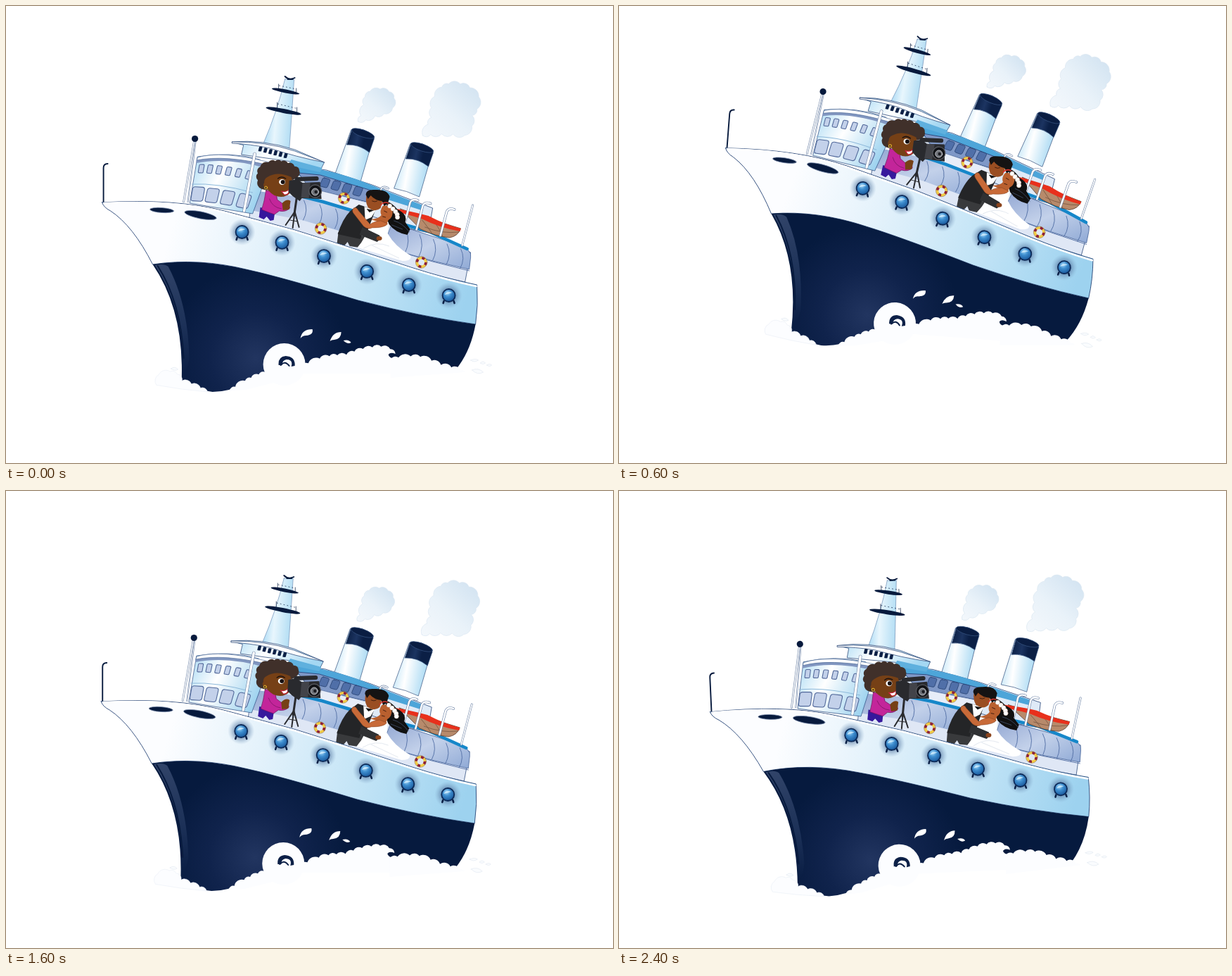
Recreate the animation shown at these times as an HTML page. Size 863 px wide and 649 px high, loop 2.6 s.

```html
<!DOCTYPE html>
<html lang="en">
<head>
<meta charset="utf-8">
<title>Wedding cruise</title>
<style>
html, body { margin: 0; width: 100%; height: 100%; overflow: hidden; background: #fff; }
svg { display: block; width: 100%; height: 100%; }
</style>
</head>
<body>
<svg viewBox="0 0 863 649" xmlns="http://www.w3.org/2000/svg" stroke-linecap="round" stroke-linejoin="round">
<defs>
  <linearGradient id="side" gradientUnits="userSpaceOnUse" x1="240" y1="300" x2="650" y2="430">
    <stop offset="0" stop-color="#fcfdff"/><stop offset=".3" stop-color="#e4f2fb"/>
    <stop offset=".65" stop-color="#c3e4f6"/><stop offset="1" stop-color="#9dd2ef"/>
  </linearGradient>
  <radialGradient id="navy" gradientUnits="userSpaceOnUse" cx="355" cy="500" r="130">
    <stop offset="0" stop-color="#223560"/><stop offset=".5" stop-color="#10234c"/><stop offset="1" stop-color="#061a3e"/>
  </radialGradient>
  <linearGradient id="stem" gradientUnits="userSpaceOnUse" x1="230" y1="370" x2="256" y2="520">
    <stop offset="0" stop-color="#4c5e84"/><stop offset=".55" stop-color="#2b4068"/><stop offset="1" stop-color="#0a1e44"/>
  </linearGradient>
  <linearGradient id="steel" x1="0" y1="0" x2="1" y2=".25">
    <stop offset="0" stop-color="#a9daf4"/><stop offset=".45" stop-color="#fff"/><stop offset="1" stop-color="#a4d7f2"/>
  </linearGradient>
  <linearGradient id="tower" x1="0" y1="0" x2="1" y2=".2">
    <stop offset="0" stop-color="#8fcdf0"/><stop offset=".5" stop-color="#e8f6fd"/><stop offset="1" stop-color="#b4def4"/>
  </linearGradient>
  <linearGradient id="house" x1="0" y1="0" x2="1" y2=".4">
    <stop offset="0" stop-color="#a5d8f3"/><stop offset=".45" stop-color="#fff"/><stop offset="1" stop-color="#9fd3ef"/>
  </linearGradient>
  <linearGradient id="glass" x1="0" y1="0" x2="1" y2="1">
    <stop offset="0" stop-color="#91a6d2"/><stop offset=".5" stop-color="#c3d1ea"/><stop offset="1" stop-color="#8fa9d5"/>
  </linearGradient>
  <linearGradient id="cap" x1="0" y1="0" x2="1" y2=".2">
    <stop offset="0" stop-color="#071a3d"/><stop offset=".45" stop-color="#1c3461"/><stop offset=".7" stop-color="#0b1f45"/>
  </linearGradient>
  <linearGradient id="smoke" x1="0" y1="1" x2="1" y2="0">
    <stop offset="0" stop-color="#f4f8fc"/><stop offset=".45" stop-color="#e9f2f9"/><stop offset="1" stop-color="#cfe1f0"/>
  </linearGradient>
  <radialGradient id="halo"><stop offset=".4" stop-color="#4d6c96" stop-opacity=".75"/><stop offset="1" stop-color="#7fa5c8" stop-opacity="0"/></radialGradient>
  <radialGradient id="lens" cx=".4" cy=".3" r=".75">
    <stop offset="0" stop-color="#a5d8f8"/><stop offset=".4" stop-color="#3f8fd0"/><stop offset="1" stop-color="#155296"/>
  </radialGradient>
</defs>

<g id="ship">
  <g id="clouds" fill="url(#smoke)" stroke="#dbe7f2" stroke-width=".7"></g>

  <!-- mast -->
  <path d="M396 104H409Q406 150 402 205L365 196Q385 150 396 104Z" fill="url(#tower)" stroke="#7f9dc0" stroke-width=".8"/>
  <g fill="none" stroke="#071a3d">
    <path d="M396 100Q402 106 410 102M400 104H407" stroke-width="1.8"/>
    <path d="M387 111V118M412 117V123M385 137V146M413 144V152" stroke-width=".7"/>
    <path d="M386 139L415 146M388 113L412 118" stroke-width=".7" stroke-dasharray="1 4"/>
  </g>
  <g fill="#071a3d">
    <ellipse cx="397" cy="121" rx="20" ry="2.6" transform="rotate(11 397 121)"/>
    <ellipse cx="394" cy="149" rx="25.5" ry="3" transform="rotate(11 394 149)"/>
  </g>

  <g id="funnels"></g>

  <!-- upper deck -->
  <path d="M400 226L455 233L520 254L606 287L600 322L500 300L400 274Z" fill="#dfeaf7" stroke="#2d4a7c" stroke-width=".8"/>
  <path d="M408 227Q470 232 530 259L592 283L590 290L520 268L412 240Z" fill="#4da5d9"/>
  <path d="M415 237L446 240L519 262L516 279L432 259Z" fill="#7f98c7" stroke="#27457c" stroke-width=".9"/>
  <g id="slots" fill="#506fa8" stroke="#2b4677" stroke-width=".8"></g>
  <path d="M433 259L520 281L516 297L430 276Z" fill="#e7edf8" stroke="#91a6cb" stroke-width=".6"/>

  <!-- promenade -->
  <path d="M350 270L425 275L500 292L575 317L660 350L652 392L580 376L345 305Z" fill="#dfe7f5" stroke="#33507f" stroke-width=".8"/>
  <path d="M352 262L422 272L497 293L490 324L420 304L347 290Z" fill="url(#glass)"/>
  <path d="M548 310L575 317L640 338Q663 346 660 357L658 374L606 362L536 342Z" fill="url(#glass)" stroke="#46649a" stroke-width=".8"/>
  <path d="M422 271L450 278L500 293M560 309L600 320L655 345" fill="none" stroke="#1687c9" stroke-width="4.500"/>
  <g id="ribs" fill="none" stroke="#526fa5" stroke-width=".9"></g>

  <!-- lifeboat -->
  <path d="M560 288Q590 299 646 316Q642 327 630 329Q610 327 589 317Z" fill="#b78a6b" stroke="#5c3a2a" stroke-width=".8"/>
  <path d="M591 304Q600 315 605 323M610 309Q618 320 620 327M595 314Q620 324 643 321" fill="none" stroke="#775641" stroke-width=".8"/>
  <path d="M542 286Q570 290 600 298Q625 311 646 316L645 320Q616 315 590 302Q565 294 542 290Z" fill="#e8301c"/>

  <!-- forward house and bridge -->
  <path d="M272 214Q317 206 360 218L373 232L350 295L261 280Z" fill="url(#house)" stroke="#3c5c8e" stroke-width=".8"/>
  <path d="M270 219Q308 206 373 225L372 231Q315 214 270 223Z" fill="#8196c0"/>
  <path d="M272 215Q306 205 374 222L373 226Q310 211 271 219Z" fill="#fff" stroke="#3c5c8e" stroke-width=".6"/>
  <path d="M264 253Q300 251 350 265" fill="none" stroke="#8db9da"/>
  <path d="M321 193Q364 189 410 204L452 222L446 234L405 221L334 211L337 198Z" fill="url(#steel)" stroke="#36527f" stroke-width=".8"/>
  <path d="M321 193Q368 192 410 206L452 222Q410 214 375 202Q346 196 321 195Z" fill="#fff" stroke="#36527f" stroke-width=".8"/>
  <path d="M405 218L449 230L446 236L400 226Z" fill="#5fb0de"/>
  <g id="panes" fill="#c3d1ea" stroke="#52699a" stroke-width="1.1"></g>
  <g id="bridge" fill="#0b2046"></g>

  <g id="rails" fill="none"></g>
  <circle cx="268" cy="188.500" r="4.600" fill="#071a3d"/>
  <path d="M138 279V230Q138 224 144 224" fill="none" stroke="#071a3d" stroke-width="1.900"/>
  <g id="rings"></g>

  <!-- camerawoman -->
  <path d="M361 286L382 291L380 304L375 305L370 299L366 303L359 300Z" fill="#36189c"/>
  <path d="M369 262Q385 262 385 275L393 281L401 277L403 287Q397 293 388 291L381 296Q367 291 363 289Q367 277 369 262Z" fill="#c3259a" stroke="#6d1259" stroke-width=".7"/>
  <path d="M374 274Q378 286 391 288" fill="none" stroke="#7e1766" stroke-width=".8"/>
  <path d="M392 280Q399 273 404 277L402 289L393 290Z" fill="#764016"/>
  <g id="hair" fill="#40302a"></g>
  <path d="M371 243Q385 234 405 243Q409 254 405 264Q395 275 381 269Q371 263 367 254Q365 246 371 243Z" fill="#764016"/>
  <circle cx="369" cy="254" r="3.500" fill="#764016"/>
  <circle cx="369" cy="258" r="2" fill="none" stroke="#e5b82e"/>
  <ellipse cx="392" cy="250" rx="4.500" ry="4" fill="#fff"/>
  <circle cx="393" cy="250" r="3" fill="#171011"/>
  <path d="M386 245Q391 241 397 245" fill="none" stroke="#1c1210" stroke-width="1.500"/>
  <path d="M391 263Q398 265 402 260Q402 269 395 268Z" fill="#fff" stroke="#c51f38" stroke-width="1.200"/>
  <!-- camera on tripod -->
  <g fill="none" stroke="#292a2e">
    <path d="M413 270L409 298" stroke-width="3"/>
    <path d="M410 292L397 311M410 292L407 315M410 292L416 314" stroke-width="2"/>
    <path d="M403 304L414 306"/>
    <path d="M413 246L441 245" stroke-width="6"/>
  </g>
  <path d="M402 248L413 246L421 251L446 250L448 274L420 273L417 277L407 270L401 264Z" fill="#292a2e"/>
  <path d="M421 251L432 251L430 273L419 272Z" fill="#424349"/>
  <circle cx="439" cy="263" r="9" fill="#111216" stroke="#55575d" stroke-width="1.300"/>
  <circle cx="439" cy="264" r="5" fill="#6f7279" stroke="#c9cbd0" stroke-width=".9"/>
  <circle cx="440" cy="264" r="2.200" fill="#1a1b20"/>

  <!-- couple -->
  <path d="M472 321L510 327L502 343L488 341L485 335L480 341L470 337Z" fill="#393a3c"/>
  <path d="M517 303Q529 302 544 306L542 323Q552 341 574 354Q578 362 563 362L499 343Q514 326 517 303Z" fill="#fff"/>
  <path d="M508 344Q526 333 544 341M520 340L558 358" fill="none" stroke="#e4e9f0"/>
  <path d="M541 278Q548 279 556 289Q571 296 567 307L574 317L570 325Q553 322 544 310L540 300Z" fill="#111"/>
  <path d="M551 305Q563 308 573 321M548 311L563 317" fill="none" stroke="#40506b" stroke-width=".8"/>
  <path d="M535 284Q541 281 549 290Q550 300 543 304L541 309L527 306L518 303Q530 302 533 297Q530 291 535 284Z" fill="#b9602f"/>
  <path d="M501 282L513 286L524 291L520 302L514 318L531 326L528 332L506 324L503 331L471 324Q478 302 489 291Z" fill="#242527"/>
  <path d="M509 285L525 290L519 300L510 304Z" fill="#fff"/>
  <path d="M512 288L523 290L516 293Z" fill="#151515"/>
  <path d="M494 287Q490 290 494 295L508 313Q514 318 520 315Q539 315 542 309L532 305Q522 306 517 310L500 290Q498 285 494 287Z" fill="#c86a38" stroke="#7c3f20" stroke-width=".5"/>
  <path d="M506 314L528 325L533 330L527 335L502 325Z" fill="#303133"/>
  <ellipse cx="530" cy="330" rx="4" ry="3" fill="#8c451d"/>
  <path d="M513 266Q524 267 535 276L532 287Q524 294 514 286Q509 276 513 266Z" fill="#9a4e22"/>
  <path d="M511 268Q511 260 524 261Q542 260 545 271L542 281L537 284L534 277Q524 276 518 269L514 274Z" fill="#151313"/>
  <path d="M532 283Q537 277 543 280" fill="none" stroke="#d7332b" stroke-width="1.500"/>
  <path d="M520 277Q524 279 527 277M537 291L541 293M535 299L539 300" fill="none" stroke="#39190d" stroke-width=".9"/>
  <g id="flowers" fill="#fff" stroke="#e4c8b8" stroke-width=".5"></g>

  <!-- hull -->
  <path d="M136 279Q240 273 310 291L410 318L480 340L575 371Q625 387 669 396Q671 425 667 452Q589 441 500 418Q394 386 345 375Q273 357 208 367Q180 312 148 291Q138 286 136 279Z" fill="url(#side)" stroke="#2a4778" stroke-width=".9"/>
  <path d="M139 280Q240 275 310 293L410 320L480 342L575 373Q625 389 668 398" fill="none" stroke="#fff" stroke-width="2.500"/>
  <path d="M208 367Q273 357 345 375Q394 386 500 418Q589 441 667 452Q660 490 640 515L560 506L430 516L340 535Q318 548 293 548Q270 546 249 533Q253 433 208 367Z" fill="url(#navy)"/>
  <path d="M211 368Q224 365 230 370Q258 422 260 500Q257 520 251 522Q254 432 211 368Z" fill="url(#stem)" opacity=".6"/>
  <path d="M215 369Q248 420 252 500" fill="none" stroke="#071a3d" stroke-width="2"/>
  <g fill="#071a3d" stroke="#8091b1" stroke-width=".7">
    <ellipse cx="221" cy="290" rx="17" ry="3.500" transform="rotate(4 221 290)"/>
    <ellipse cx="276" cy="297" rx="23" ry="5" transform="rotate(11 276 297)"/>
  </g>
  <g id="ports"></g>

  <!-- surf -->
  <g id="surf" fill="#fcfdff"></g>
  <circle cx="395" cy="509" r="30" fill="#fcfdff"/>
  <path d="M387 510Q386 498 397 497Q411 498 410 511L405 512Q408 502 398 502Q392 503 392 510Z" fill="#0c2047"/>
  <path d="M390 510Q396 503 402 511" fill="none" stroke="#0c2047" stroke-width="2"/>
  <g fill="#fff">
    <path d="M418 472Q420 459 435 459Q437 467 426 468Q421 468 418 472Z"/>
    <path d="M460 476Q464 463 476 463Q476 473 466 474Q462 474 460 476Z"/>
    <path d="M479 475Q487 473 490 478Q485 481 479 475Z"/>
  </g>
  <path d="M660 503Q667 500 671 503Q665 507 660 503ZM674 507Q677 503 681 507Q677 510 674 507ZM662 517Q671 513 678 520Q670 525 662 517ZM683 510Q687 507 690 510Q687 513 683 510ZM234 515Q239 511 244 516Q239 519 234 515Z" fill="#fafcfe" stroke="#e4eaf2" stroke-width=".7"/>
</g>
</svg>

<script>
const byId = id => document.getElementById(id);
const fill = (id, ...parts) => { byId(id).innerHTML = parts.join(''); };
const repeat = (n, make) => Array.from({ length: n }, (_, i) => make(i)).join('');
const circle = (x, y, r, more = '') => `<circle cx="${x}" cy="${y}" r="${r}" ${more}/>`;

let seed = 7;
const random = () => (seed = seed * 16807 % 2147483647) / 2147483647;

// Rounded bumps of about the given width along a guide curve
function bumps(guide, width, tail = 'Z') {
  const line = document.createElementNS('http://www.w3.org/2000/svg', 'path');
  line.setAttribute('d', guide);
  const length = line.getTotalLength();
  let from = line.getPointAtLength(0), d = `M${from.x} ${from.y}`;
  for (let at = 0; at < length;) {
    at += width * (.7 + .6 * random());
    if (length - at < width * .4) at = length;
    const to = line.getPointAtLength(at);
    const r = Math.hypot(to.x - from.x, to.y - from.y) * .66;
    d += `A${r} ${r} 0 0 1 ${to.x} ${to.y}`;
    from = to;
  }
  return `<path d="${d}${tail}"/>`;
}

function pane(x, y, w, h, tilt) {
  return `<rect x="${-w / 2}" y="${-h / 2}" width="${w}" height="${h}" rx="${Math.min(w, h) * .2}"
    transform="translate(${x} ${y}) rotate(${tilt}) skewX(-7)"/>`;
}

function funnel(x, y) {
  return `<g transform="translate(${x} ${y})" stroke="#36527f" stroke-width=".7">
    <path d="M-15 -5L-38 58Q-20 61 -2 70L17 5Z" fill="url(#steel)"/>
    <path d="M-14 -5Q4 -11 18 7L11 27Q-4 15 -21 16Z" fill="url(#cap)"/>
    <ellipse cx="2" cy="0" rx="17" ry="5" transform="rotate(19 2 0)" fill="#0a1d42"/></g>`;
}

function ring(x, y, r = 6.3) {
  const band = (color, more = '') => circle(x, y, r, `fill="none" stroke="${color}" stroke-width="3.6" ${more}`);
  return band('#f1cb45') + band('#8c1f3b', 'stroke-dasharray="4 5.9" stroke-linecap="butt"')
    + circle(x, y, r + 2, 'fill="none" stroke="#8a6430" stroke-width=".5"');
}

function port(i) {
  const sag = Math.sin(i * Math.PI * .4);
  const x = 335 + i * 58.8 - 2 * sag, y = 321 + i * 18 - 3.3 * sag;
  return circle(x, y, 19, 'fill="url(#halo)"')
    + `<path d="M${x - 7} ${y + 8}l-1 3M${x + 7} ${y + 8}l1 3" stroke="#0b2046" stroke-width="2.5"/>`
    + circle(x, y, 9, 'fill="url(#lens)" stroke="#0c2a58" stroke-width="1.8"')
    + `<path d="M${x - 6} ${y - 1}q3 -6 11 -3q-5 2 -11 3Z" fill="#d6effd" opacity=".75"/>`;
}

// White tube with a grey outline
function rail(d, w) {
  return `<path d="${d}" stroke="#6d83a6" stroke-width="${w + 1.2}"/><path d="${d}" stroke="#fff" stroke-width="${w}"/>`;
}
const davit = x => rail(`M${x} ${313 + (x - 565) / 4}l9 -34q3 -6 11 -3`, 2.4);
const rib = (x, y, h) => `<path d="M${x} ${y}q7 ${h * .5} -1 ${h}"/>`;

fill('clouds',
  bumps('M500 164Q508 150 508 138Q509 119 530 118Q552 119 552 138Q548 154 527 154Q512 163 500 164Z', 13),
  bumps('M592 184Q594 170 605 164Q599 130 623 112Q650 104 671 126Q675 144 662 155Q664 176 655 184Q622 179 592 184Z', 15));
fill('funnels', funnel(505, 181), funnel(589, 201));
fill('slots', repeat(4, i => pane(453 + i * 15.5, 251 + i * 4, 11, 13, 15)));
fill('ribs',
  repeat(3, i => rib(423 + i * 22.5, 276 + i * 6, 28)),
  repeat(5, i => rib(568 + i * 19.5, 318 + i * 6.7, 32 - i)),
  '<path d="M536 342L606 363L658 376"/>');
fill('panes',
  repeat(6, i => pane(277 + i * 12 + i * i * .3, 231 + (i + i * i) * .3, 7, 12, 3 + i * 2)),
  repeat(4, i => pane(272 + i * 20 + i * i * .6, 267 + i * 1.5 + i * i * .6, 17, 20, 3 + i * 3)));
fill('bridge', repeat(6, i => pane(361 + i * 7.2, 203 + i * 1.9, 4.5, 7, 8)));
fill('rails',
  rail('M252 278L267 192', 1.5), rail('M258 278L269 192', .8), rail('M338 291L353 210', 3.4),
  rail('M530 270L533 259Q537 255 543 259', 1.6), rail('M648 340L663 283', 1.7),
  davit(565), davit(583), davit(617));
fill('rings', ring(480, 273), ring(447, 316), ring(590, 364), ring(544, 346, 5));
fill('hair', bumps('M363 260Q352 244 361 228Q372 220 386 220Q408 222 418 236Q418 244 404 246', 11, 'Q390 235 374 244L371 262Z'));
fill('flowers', repeat(5, i => circle(545 + 11 * Math.sin(i * .42), 284 + i * 4, 3.1)));
fill('ports', repeat(6, port));
fill('surf',
  `<g stroke="#e9eef6" stroke-width=".6">${bumps('M213 538Q208 521 232 519Q246 521 250 533Q268 537 286 548', 14, 'L249 544L230 541Z')}</g>`,
  bumps('M317 547Q338 530 368 520', 13, 'L400 530L340 545Z'),
  bumps('M416 515Q448 494 482 496Q512 482 542 484L553 494', 14, 'Q546 491 543 495Q544 500 552 501V522H416Z'),
  bumps('M546 502Q590 490 612 509Q630 511 652 520', 14, 'L546 528Z'));

// Turning points of the swell: step, heave, tilt in degrees
const HOLD = 200, STEPS = 13, PIVOT = [482, 366];
const swell = [
  [0, 0, 0], [2, -19.5, 14.2], [3, -51, 4.4], [4, -59.5, 0], [5, -32.5, 2.2], [7, -18.5, -3],
  [8, 20, 0], [9, 42, 0], [10, 62, -3.1], [11, 38, -5.2], [STEPS, 0, 0]
];
const ship = byId('ship');

function draw(ms) {
  const step = Math.floor(ms / HOLD) % STEPS;
  const next = swell.findIndex(key => key[0] > step);
  const a = swell[next - 1], b = swell[next];
  const mix = i => a[i] + (b[i] - a[i]) * (step - a[0]) / (b[0] - a[0]);
  const heave = mix(1), tilt = mix(2);
  const x = PIVOT[0] + .6 + .85 * tilt - .068 * heave;
  ship.setAttribute('transform', `translate(${x} ${PIVOT[1] + heave}) rotate(${tilt}) translate(${-PIVOT[0]} ${-PIVOT[1]})`);
}

const start = performance.now();
function tick() {
  draw(performance.now() - start);
  requestAnimationFrame(tick);
}
tick();
</script>
</body>
</html>
```
